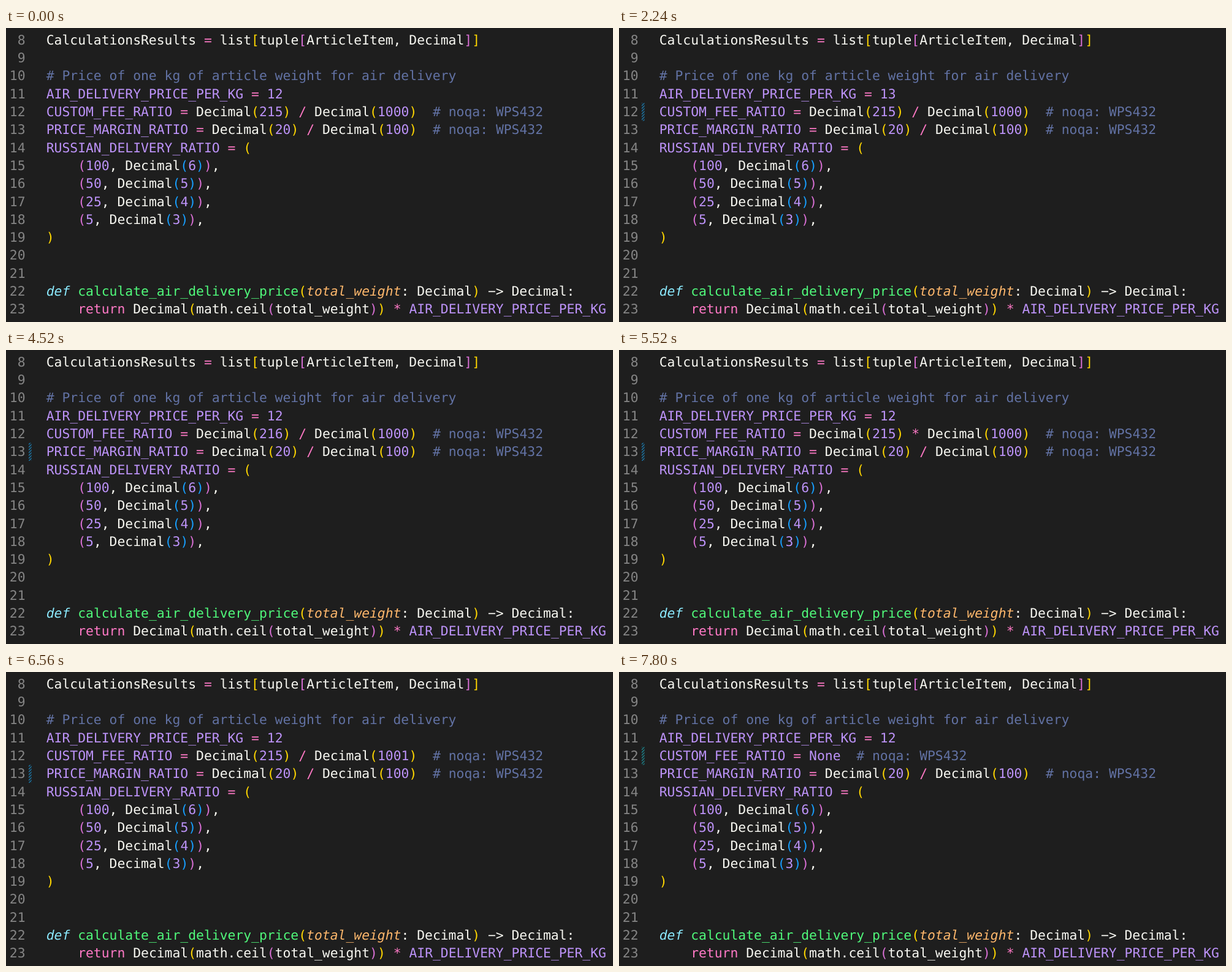
Animation, 990 px wide and 480 px high, one loop 8 s. Source, as an HTML page:

```html
<!DOCTYPE html>
<html lang="en">
<head>
<meta charset="utf-8">
<title>Code mutations</title>
<style>
  html, body { margin: 0; width: 100%; height: 100%; overflow: hidden; background: #1e1e1e; }
  svg { display: block; width: 990px; height: 480px; }
  text { font: 21.36px "DejaVu Sans Mono", monospace; font-variant-ligatures: none;
         white-space: pre; fill: #f8f8f2; text-rendering: geometricPrecision; }
  .number { fill: #858585; text-anchor: end; }
  .comment { fill: #6272a4; }
  .constant { fill: #bd93f9; }
  .operator { fill: #ff79c6; }
  .def { fill: #8be9fd; font-style: italic; }
  .function { fill: #50fa7b; }
  .param { fill: #ffb86c; font-style: italic; }
  .b0 { fill: #ffd700; }
  .b1 { fill: #da70d6; }
  .b2 { fill: #179fff; }
</style>
</head>
<body>
<svg viewBox="0 0 990 480">
  <defs>
    <pattern id="hatch" width="3.2" height="3.2" patternUnits="userSpaceOnUse" patternTransform="rotate(45)">
      <rect id="stripe" width="1.6" height="3.2"/>
    </pattern>
  </defs>
  <g id="code"></g>
  <rect id="marker" x="37" width="4.6" height="29.32" fill="url(#hatch)"/>
</svg>
<script>
const LOOP = 8000, FIRST_LINE = 8, LINE_HEIGHT = 29.32, TOP = 5, BASELINE = 21.65;

const SOURCE = `CalculationsResults = list[tuple[ArticleItem, Decimal]]

# Price of one kg of article weight for air delivery
AIR_DELIVERY_PRICE_PER_KG = 12
CUSTOM_FEE_RATIO = Decimal(215) / Decimal(1000)  # noqa: WPS432
PRICE_MARGIN_RATIO = Decimal(20) / Decimal(100)  # noqa: WPS432
RUSSIAN_DELIVERY_RATIO = (
    (100, Decimal(6)),
    (50, Decimal(5)),
    (25, Decimal(4)),
    (5, Decimal(3)),
)


def calculate_air_delivery_price(total_weight: Decimal) −> Decimal:
    return Decimal(math.ceil(total_weight)) * AIR_DELIVERY_PRICE_PER_KG`.split("\n");

// Each edit pushes the gutter marker down to `shifted`; it settles on the edited line later.
const MUTATIONS = [
  { at: 1480, settle: 1680, line: 8, from: "list[tuple[ArticleItem, Decimal]]", to: "None" },
  { at: 2200, settle: 2520, line: 11, shifted: 12, from: "12", to: "13" },
  { at: 3320, settle: 3640, line: 11, shifted: 12, from: "12", to: "None" },
  { at: 4520, settle: 4720, line: 12, shifted: 13, from: "215", to: "216" },
  { at: 5520, settle: 5800, line: 12, shifted: 13, from: "/", to: "*" },
  { at: 6360, settle: 6680, line: 12, shifted: 13, from: "1000", to: "1001" },
  { at: 7320, settle: 7640, line: 12, shifted: 13, from: "Decimal(215) / Decimal(1000)", to: "None" },
];

const TOKEN = /#.*|\w+|[()[\]]|−>|[=*\/]|[^\w()[\]#=*\/−]+/g;
const code = document.getElementById("code");
const marker = document.getElementById("marker");
const stripe = document.getElementById("stripe");
const lineTop = line => TOP + (line - FIRST_LINE) * LINE_HEIGHT;

function tokenClass(token, line) {
  if (token[0] === "#") return "comment";
  if (token === "def") return "def";
  if (token === "return" || /^[=*\/]$/.test(token)) return "operator";
  if (token.startsWith("calculate_")) return "function";
  if (token === "total_weight" && line.startsWith("def")) return "param";
  if (token === "None" || /^(\d+|[A-Z]+(_[A-Z]+)+)$/.test(token)) return "constant";
  return "";
}

function render(lines) {
  let depth = 0;
  const paint = (token, line) => {
    let name;
    if (/^[([]$/.test(token)) name = "b" + depth++ % 3;
    else if (/^[)\]]$/.test(token)) name = "b" + --depth % 3;
    else name = tokenClass(token, line);
    const text = token.replace(/>/g, "&gt;");
    return name ? `<tspan class="${name}">${text}</tspan>` : text;
  };
  code.innerHTML = lines.map((line, i) => {
    const y = lineTop(i + FIRST_LINE) + BASELINE;
    const body = (line.match(TOKEN) || []).map(token => paint(token, line)).join("");
    return `<text class="number" x="31.5" y="${y}">${i + FIRST_LINE}</text>
            <text x="65.7" y="${y}">${body}</text>`;
  }).join("");
}

const start = performance.now();
let shown = null;

function frame() {
  const t = (performance.now() - start) % LOOP;
  const mutation = MUTATIONS.findLast(m => t >= m.at);
  if (mutation !== shown) {
    shown = mutation;
    render(SOURCE.map((line, i) =>
      mutation && i + FIRST_LINE === mutation.line ? line.replace(mutation.from, mutation.to) : line));
  }
  const settled = mutation && t >= mutation.settle;
  const markedLine = mutation && (settled ? mutation.line : mutation.shifted);
  marker.style.display = markedLine ? "" : "none";
  if (markedLine) marker.setAttribute("y", lineTop(markedLine));
  stripe.setAttribute("fill", settled ? "#1c7a82" : "#1b6f9c");
  requestAnimationFrame(frame);
}
frame();
</script>
</body>
</html>
```
